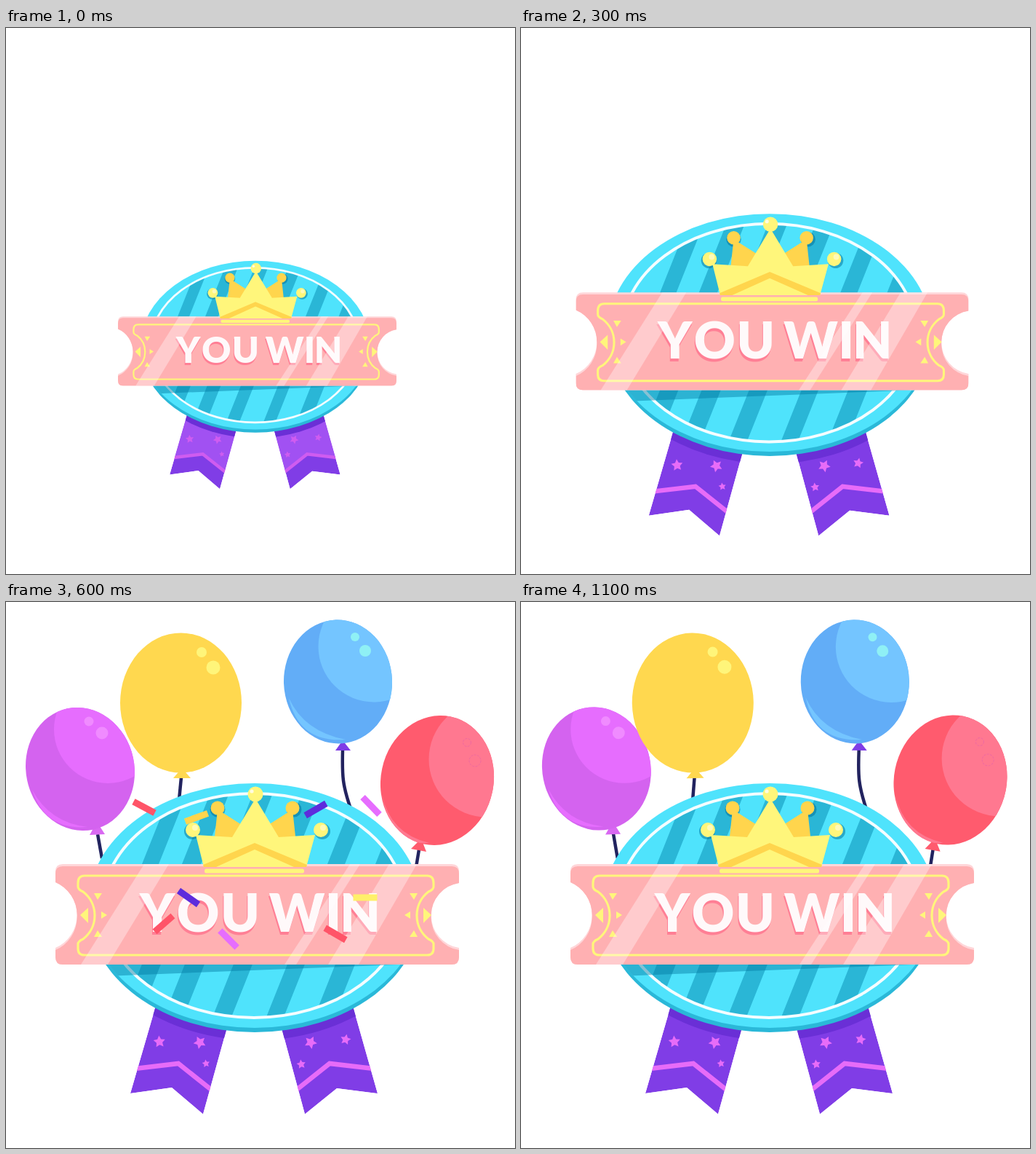
An HTML page that plays this animation: 700x750 px, repeating every 1.2 s.

```html
<!DOCTYPE html>
<html lang="en">
<head>
<meta charset="utf-8">
<title>You win badge</title>
<style>
  html, body { margin: 0; width: 100%; height: 100%; overflow: hidden; background: #fff; }
  svg { display: block; width: 700px; height: 750px; }
  .word { font: 900 72px Lato, "Open Sans", sans-serif; text-anchor: middle; }
</style>
</head>
<body>
<svg id="stage" viewBox="0 0 700 750" xmlns="http://www.w3.org/2000/svg"></svg>
<script>
const STEP = 100, LOOP = 1200;
const PIVOT = { x: 345.5, y: 477 };

// Badge size at each step; it stays at 1 afterwards
const SIZES = [0.69, 1.13, 1.05, 0.973, 0.988];
// Balloon swing, as a share of the full angle, from 600 ms on
const SWING = [0, 0.5, 1, 0.75, 0.5, 0.25];
// Confetti travel and opacity from 500 ms on
const FALL = [-0.76, 0, 0.55, 1, 1.35, 1.6];
const FADE = [0.55, 1, 1, 1, 0.67, 0.33];

const NAVY = '#22235f', VIOLET = '#803de6', PINK = '#e66dfe';
const GOLD = '#ffd54d', LEMON = '#fff67b';

const balloons = [
  { x: 102, y: 229.5, rx: 74.5, ry: 85, tilt: -12, base: '#d463ef', light: PINK,
    glow: [140, 175, 74], dots: [[132, 180, 8.5], [114, 164, 6.5]], dot: '#f08bff',
    rim: 'M36 258Q60 303 112 309Q54 314 36 258',
    knot: '125,302 115,320 136,319', tie: '#d968f2', string: 'M126 319L132 352',
    from: [69, 92], swing: 2, pivot: [160, 440] },
  { x: 240.5, y: 138.5, rx: 83.5, ry: 96, tilt: 0, base: '#ffd84f',
    dots: [[285, 90, 9.5], [269, 69, 7]], dot: '#fff57a',
    knot: '242,228 230,242 254,242', tie: '#ffd84f', string: 'M241 241L238 272',
    from: [16, 117], swing: -4, pivot: [240, 380] },
  { x: 456.5, y: 109.5, rx: 74.5, ry: 85, tilt: -2, base: '#62adf7', light: '#74c5ff',
    glow: [506, 61, 76.5], dots: [[494, 67, 8], [480, 48, 6]], dot: '#8ff0f5',
    rim: 'M389 132Q410 178 467 189Q403 194 389 132',
    knot: '463,190 453,204 474,204', tie: VIOLET, string: 'M463 203C462 240 463 252 474 284',
    from: [-19, 123], swing: 2.6, pivot: [465, 355] },
  { x: 593, y: 245, rx: 77.5, ry: 89.5, tilt: 12, base: '#ff5b6e', light: '#ff7890',
    glow: [661, 216, 79.5], dots: [[645, 218, 8], [634, 193, 5.5]], ring: '#ef6aa0',
    rim: 'M517 264Q528 318 582 331Q530 336 517 264',
    knot: '571,325 557,339 578,343', tie: '#ff5b6e', string: 'M568 340L564 364',
    from: [-71, 87], swing: -2.6, pivot: [549, 467] }
];

// colour, x, y, angle, then the change of each during the fall
const confetti = [
  ['#ff5468', 190, 282, 28, -2, 45, 5],
  [GOLD, 262, 296, -20, 0, 32, -8],
  ['#5e2cdc', 426, 285, -30, 0, 33, 0],
  [PINK, 502, 280, 46, 1, 35, 12],
  ['#5e2cdc', 251, 406, 35, -1, 59, 9],
  ['#ff5468', 217, 442, -41, -7, 51, -11],
  [PINK, 306, 463, 45, -3, 45, 15],
  ['#ff5468', 453, 456, 30, 1, 46, 12],
  ['#fff06a', 494, 406, 0, 1, 49, 8]
];

const circle = (x, y, r, fill) => `<circle cx="${x}" cy="${y}" r="${r}" fill="${fill}"/>`;
const poly = (points, fill) => `<polygon points="${points}" fill="${fill}"/>`;
const oval = (x, y, rx, ry, extra) => `<ellipse cx="${x}" cy="${y}" rx="${rx}" ry="${ry}" ${extra}/>`;
const clip = (id, shape) => `<clipPath id="${id}">${shape}</clipPath>`;

function star(x, y, r, turn) {
  const points = Array.from({ length: 10 }, (_, i) => {
    const a = (i * 36 - 90 + turn) * Math.PI / 180, d = i % 2 ? r * 0.5 : r;
    return `${(x + d * Math.cos(a)).toFixed(1)},${(y + d * Math.sin(a)).toFixed(1)}`;
  });
  return `<polygon class="trim" points="${points.join(' ')}"/>`;
}

function balloon(b, i) {
  const body = oval(b.x, b.y, b.rx, b.ry, `fill="${b.base}" transform="rotate(${b.tilt} ${b.x} ${b.y})"`);
  const dots = b.dots.map(([x, y, r]) => b.ring
    ? `<circle cx="${x}" cy="${y}" r="${r}" fill="none" stroke="${b.ring}" stroke-dasharray="3 1.5"/>`
    : circle(x, y, r, b.dot)).join('');
  const shine = b.glow
    ? `<g clip-path="url(#skin${i})">${circle(...b.glow, b.light)}<path d="${b.rim}" fill="${b.light}"/></g>` : '';
  return `<g class="balloon">${clip('skin' + i, body)}
    <path d="${b.string}" fill="none" stroke="${NAVY}" stroke-width="4.5"/>
    ${poly(b.knot, b.tie)}${body}${shine}${dots}</g>`;
}

function ribbon(id, outline, upper, chevron, stars) {
  return `${clip(id, poly(outline, '#000'))}<g clip-path="url(#${id})">
    ${poly(outline, VIOLET)}<polygon class="sheen" points="${upper}" fill="#a151f2"/>
    ${oval(343, 432, 232, 170, 'fill="#6a2fd6"')}
    <polyline class="line" points="${chevron}" fill="none" stroke-width="6.5"/>
    ${stars.map(s => star(...s)).join('')}</g>`;
}

function medal() {
  const disc = oval(342, 417, 229, 168, 'fill="#4fe3fc"');
  const stripes = [[159, 182], [214, 240], [273, 300], [340, 366], [414, 438], [480, 507]]
    .map(([a, b]) => poly(`${a + 72},250 ${b + 72},250 ${b - 64},590 ${a - 64},590`, '#2ab6d6')).join('');
  return `${clip('disc', disc)}${clip('face', oval(341, 417, 208, 154, ''))}
    ${oval(342, 423, 229, 168, 'fill="#2ab8d8"')}${disc}
    <g clip-path="url(#face)">${stripes}</g>
    ${oval(341, 417, 208, 154, 'fill="none" stroke="#f4fdff" stroke-width="4"')}
    <g clip-path="url(#disc)">${poly('110,490 110,515 540,498 540,490', 'rgba(0,120,160,.45)')}</g>`;
}

function ticket() {
  const shape = 'M78 360H613Q623 360 623 370V386A45 45 0 0 0 623 475V488Q623 498 613 498H78Q68 498 68 488V475A49 49 0 0 0 68 385V370Q68 360 78 360Z';
  const border = 'M108 376H579Q588 376 588 386V391Q588 395 581 398A41 41 0 0 0 581 463Q588 466 588 470V476Q588 485 579 485H108Q99 485 99 476V470Q99 466 106 463A41 41 0 0 0 106 398Q99 395 99 391V386Q99 376 108 376Z';
  const marks = ['102,430 113,420 113,441', '131,425 139,430 131,435', '121,400 132,400 126,409', '121,460 132,460 126,451']
    .map(p => poly(p, LEMON)).join('');
  const gloss = ['190,360 224,360 140,498 103,498', '473,360 487,360 399,498 383,498', '527,360 565,360 485,498 443,498']
    .map(p => poly(p, 'rgba(255,255,255,.34)')).join('');
  const word = (dx, dy, fill) =>
    `<text class="word" x="208 264 322 350 400 450 487" y="453" fill="${fill}" transform="translate(${dx} ${dy})">YOU WIN</text>`;
  return `${clip('paper', `<path d="${shape}"/>`)}
    <path d="${shape}" fill="#ffd6d9"/>
    <g clip-path="url(#paper)"><path d="${shape}" fill="#ffb0b2" transform="translate(0 3)"/></g>
    <path d="${border}" fill="none" stroke="${LEMON}" stroke-width="3.2"/>
    ${marks}<g transform="matrix(-1 0 0 1 687 0)">${marks}</g>
    ${word(-1, 4, '#ff7f95')}${word(0, 0, '#fff9fa')}
    ${gloss}`;
}

function crown() {
  const shade = 'rgba(0,110,150,.5)';
  const back = circle(291, 283, 9.5, GOLD) + poly('291,285 324,306 309,328 287,322', GOLD);
  const ends = [[257, 313], [433, 313]];
  return `<g clip-path="url(#disc)">${circle(256, 315, 11, shade)}${circle(435, 315, 11, shade)}
      ${circle(291, 285, 10.5, shade)}${circle(396, 285, 10.5, shade)}</g>
    ${back}<g transform="matrix(-1 0 0 1 685 0)">${back}</g>
    ${poly('261,320 311,323 343,270 375,323 425,320 413,364 272,364', LEMON)}
    ${poly('271,361 342,331 414,361 413,364 396,364 342,340 289,364 272,364', GOLD)}
    <rect x="273" y="366.5" width="137" height="6" rx="2.5" fill="${LEMON}"/>
    ${ends.map(([x, y]) => circle(x, y, 10, LEMON) + circle(x + 3, y - 3, 4, '#fffab8')).join('')}
    ${circle(343, 264, 10.5, LEMON)}${circle(338, 260, 2.6, '#fffde0')}`;
}

const stage = document.getElementById('stage');
stage.innerHTML = `
  <g id="balloons">${balloons.map(balloon).join('')}</g>
  <g id="badge">
    ${ribbon('left', '212,534 318,534 271,703.5 228,667 171,675', '180,520 330,520 282,670 237,634 160,643',
      '160,643 237,634 300,684', [[211, 604, 8.5, -5], [266.5, 605, 9, -26], [275, 634, 5.5, -8]])}
    ${ribbon('right', '365,534 471,534 511,675 455,668 411,703.5', '350,520 500,520 522,643 445,634 400,670',
      '382,684 445,634 522,643', [[419, 605, 9, 26], [467, 601, 7.5, 12], [406, 635, 6.5, -8]])}
    ${medal()}${ticket()}${crown()}
  </g>
  <g id="confetti">${confetti.map(c =>
    `<rect x="-16.5" y="-4.5" width="33" height="9" fill="${c[0]}"/>`).join('')}</g>`;

const all = selector => [...stage.querySelectorAll(selector)];
const badge = stage.querySelector('#badge');
const balloonGroup = stage.querySelector('#balloons');
const balloonEls = all('.balloon'), pieces = all('#confetti rect');
const sheens = all('.sheen'), lines = all('.line'), trims = all('.trim');

function draw(step) {
  const size = SIZES[step] ?? 1;
  badge.setAttribute('transform',
    `translate(${PIVOT.x} ${PIVOT.y}) scale(${size}) translate(${-PIVOT.x} ${-PIVOT.y})`);

  // The ribbons open with a paler upper part
  const accent = step === 0 ? '#cf5cf0' : '#e76cf8';
  sheens.forEach(el => el.setAttribute('opacity', step === 0 ? 1 : 0));
  lines.forEach(el => el.setAttribute('stroke', accent));
  trims.forEach(el => el.setAttribute('fill', accent));

  balloonGroup.setAttribute('visibility', step < 5 ? 'hidden' : 'visible');
  balloons.forEach((b, i) => {
    const [dx, dy] = b.from;
    balloonEls[i].setAttribute('transform', step < 6
      ? `translate(${b.x + dx} ${b.y + dy}) scale(.745) translate(${-b.x} ${-b.y})`
      : `rotate(${b.swing * SWING[step - 6]} ${b.pivot.join(' ')})`);
  });

  const fall = FALL[step - 5] ?? 0, fade = FADE[step - 5] ?? 0;
  confetti.forEach(([, x, y, angle, dx, dy, spin], i) => {
    pieces[i].setAttribute('opacity', fade);
    pieces[i].setAttribute('transform',
      `translate(${x + dx * fall} ${y + dy * fall}) rotate(${angle + spin * fall})`);
  });
}

const start = performance.now();
function tick() {
  const time = (performance.now() - start) % LOOP;
  draw(Math.floor(time / STEP));
  requestAnimationFrame(tick);
}
tick();
</script>
</body>
</html>
```
